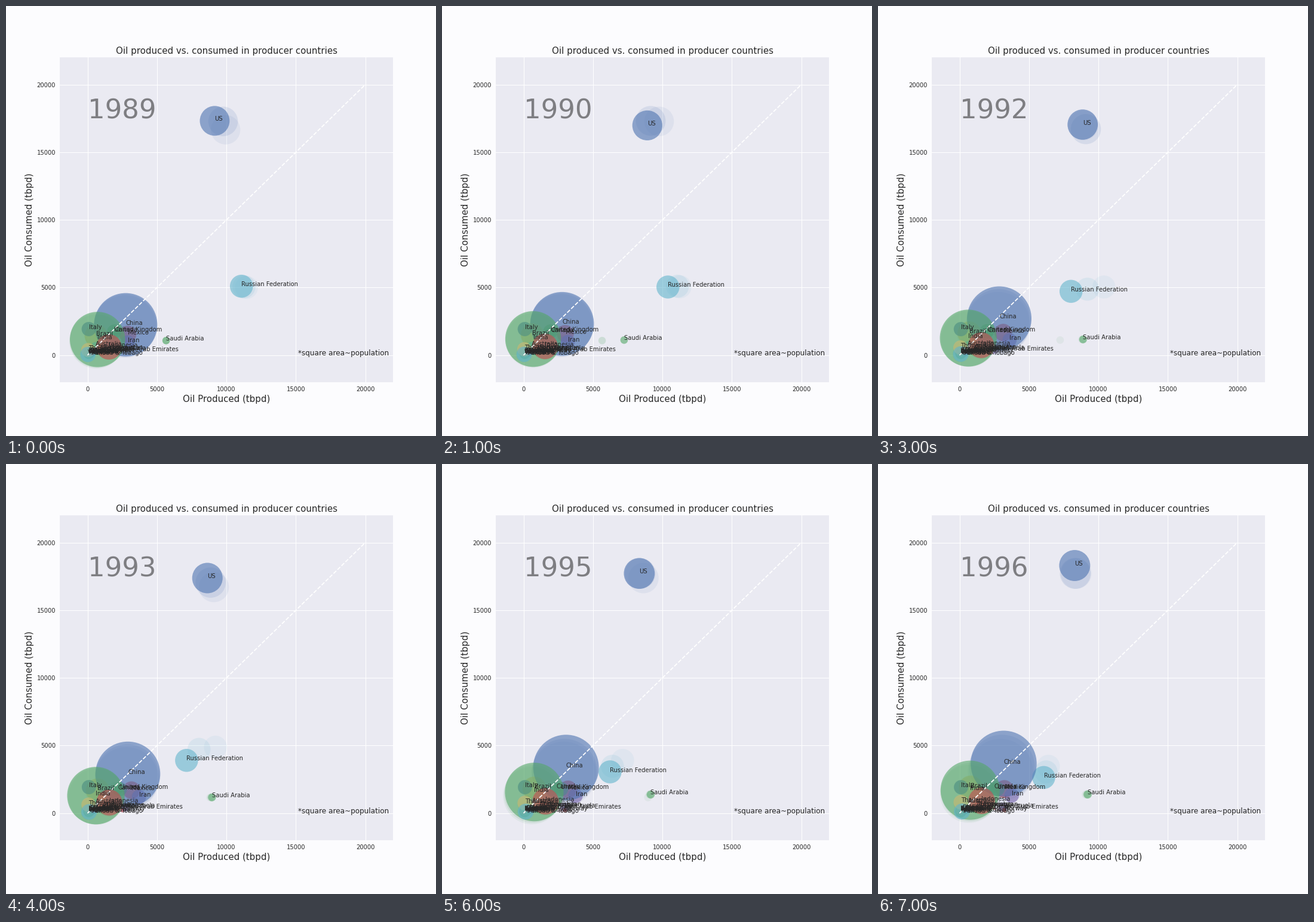
A matplotlib script for the animation above (8 s loop, 720 by 720 pixels).

```python
import random
from itertools import cycle

import numpy as np
import matplotlib.pyplot as plt
from matplotlib.animation import FuncAnimation

FIRST, LAST = 1989, 1996
INK = "#262626"
PANEL = "#eaeaf2"
PALETTE = ["#4c72b0", "#55a868", "#c44e52", "#8172b2", "#ccb974", "#64b5cd"]

plt.rcParams.update({
    "font.family": "DejaVu Sans", "font.size": 10,
    "text.color": INK, "axes.labelcolor": INK,
    "xtick.color": INK, "ytick.color": INK,
})

# Drawing order; "-" uses up a palette colour without a country.
ORDER = """US,Canada,Mexico,Argentina,Brazil,Colombia,Ecuador,Peru,
Trinidad & Tobago,Venezuela,Azerbaijan,Denmark,Italy,Kazakhstan,Norway,-,
Romania,Russian Federation,Turkmenistan,United Kingdom,Uzbekistan,Iran,-,
Kuwait,Qatar,Saudi Arabia,United Arab Emirates,Algeria,Egypt,Australia,
China,India,Indonesia,Malaysia,Thailand,Vietnam""".replace("\n", "").split(",")


class Country:
    """A bubble moving straight between (year, produced, consumed) points."""

    def __init__(self, people, *path, growth=0.012):
        self.people, self.growth = people, growth
        self.years, self.made, self.used = zip(*path)

    def at(self, year):
        return (np.interp(year, self.years, self.made),
                np.interp(year, self.years, self.used))

    def area(self, year):
        return (2 * 1.585) ** 2 * self.people * (1 + self.growth) ** (year - FIRST)


def drift(people, start, end, **kw):
    return Country(people, (FIRST, *start), (LAST, *end), **kw)


def small_producer(rng):
    """A minor producer near the origin, slowly growing or shrinking."""
    made = 60 + 1200 * rng.random() ** 2
    used = 80 + 0.2 * made + 150 * rng.random()
    gain = rng.uniform(0.8, 1.5)
    return drift(rng.uniform(4, 35), (made, used), (made * gain, used * gain))


MAIN = {
    "US": Country(247, (1987, 9944, 16665), (1988, 9765, 17283),
                  (1989, 9159, 17325), (1990, 8914, 16988), (1991, 9100, 16713),
                  (1994, 8400, 17719), (1995, 8335, 17725), (1996, 8295, 18309)),
    "Russian Federation": Country(
        147.7, (1987, 11450, 5010), (1989, 11085, 5100), (1990, 10400, 5042),
        (1992, 8030, 4720), (1993, 7135, 3905), (1994, 6400, 3470),
        (1996, 6065, 2640), growth=0),
    "Saudi Arabia": Country(15.6, (1989, 5660, 1080), (1991, 8830, 1160),
                            (1993, 8965, 1170), (1994, 9090, 1380),
                            (1996, 9230, 1385), growth=0.025),
    "China": Country(1118, (1987, 2690, 2120), (1990, 2778, 2320),
                     (1994, 2945, 3090), (1996, 3180, 3660)),
    "India": Country(850, (1987, 640, 1010), (1989, 720, 1165), (1993, 600, 1300),
                     (1995, 774, 1567), (1996, 765, 1700), growth=0.02),
    "Mexico": Country(82, (1989, 2897, 1545), (1991, 3126, 1650), (1996, 3230, 1790)),
    "Iran": Country(54, (1989, 2894, 950), (1991, 3500, 1030),
                    (1993, 3712, 1210), (1996, 3759, 1320)),
    "United Kingdom": Country(57, (1989, 1920, 1740), (1992, 1981, 1770),
                              (1994, 2675, 1790), (1996, 2735, 1790), growth=0),
    "Canada": Country(27.3, (1989, 1960, 1750), (1991, 1980, 1660), (1996, 2480, 1860)),
    "Kuwait": Country(2, (1989, 1410, 100), (1991, 185, 70),
                      (1993, 1945, 105), (1996, 2130, 140)),
    "Italy": drift(56.7, (90, 1930), (110, 1920), growth=0),
    "Brazil": drift(147, (615, 1440), (807, 1900)),
    "Indonesia": drift(180, (1540, 610), (1590, 920)),
    "Venezuela": drift(19, (2060, 395), (3137, 450)),
    "United Arab Emirates": drift(2, (1950, 310), (2500, 355)),
    "Norway": drift(4.3, (1554, 200), (3232, 220)),
    "Australia": drift(17, (570, 690), (610, 800)),
    "Thailand": drift(56, (50, 380), (100, 810)),
    "Vietnam": drift(66, (30, 55), (180, 130)),
    "Trinidad & Tobago": drift(1.2, (150, 20), (141, 20)),
}

rng = random.Random(4)
names, colors, countries = [], [], []
for name, color in zip(ORDER, cycle(PALETTE)):
    if name != "-":
        names.append(name)
        colors.append(color)
        countries.append(MAIN.get(name) or small_producer(rng))


def bubbles(year):
    return (np.array([c.at(year) for c in countries]),
            np.array([c.area(year) for c in countries]))


fig = plt.figure(figsize=(10, 10), dpi=72, facecolor="#fcfcfe")
ax = fig.add_axes([0.125, 0.125, 0.775, 0.755], facecolor=PANEL)
ticks = range(0, 20001, 5000)
ax.set(xlim=(-2000, 22000), ylim=(-2000, 22000), xticks=ticks, yticks=ticks)
ax.set_axisbelow(True)
ax.grid(color="white", lw=1)
ax.tick_params(length=0, pad=7)
for spine in ax.spines.values():
    spine.set_visible(False)
ax.set_title("Oil produced vs. consumed in producer countries", fontsize=15)
ax.set_xlabel("Oil Produced (tbpd)", fontsize=15)
ax.set_ylabel("Oil Consumed (tbpd)", fontsize=15)

ax.plot([0, 20000], [0, 20000], "--", color="white", lw=1.75)
ax.text(15140, 0, "*square area~population", fontsize=12)
year_text = ax.text(0, 17500, "", fontsize=45, alpha=0.55)

# Oldest layer first: two fading traces, then the current year.
layers = []
for age, alpha in ((2, 0.08), (1, 0.13), (0, 0.6)):
    pos, area = bubbles(FIRST - age)
    dots = ax.scatter(*pos.T, s=area, c=colors, alpha=alpha, linewidths=0)
    layers.append((age, dots))
labels = [ax.text(0, 0, name, fontsize=10) for name in names]


def update(i):
    year = FIRST + i
    year_text.set_text(str(year))
    for age, dots in layers:
        pos, area = bubbles(year - age)
        dots.set_offsets(pos)
        dots.set_sizes(area, dpi=72)
    for label, xy in zip(labels, pos):
        label.set_position(xy)
    return [year_text, *labels]


anim = FuncAnimation(fig, update, frames=LAST - FIRST + 1, interval=1000,
                     init_func=lambda: update(0), repeat=True, repeat_delay=0)
plt.show()
```
